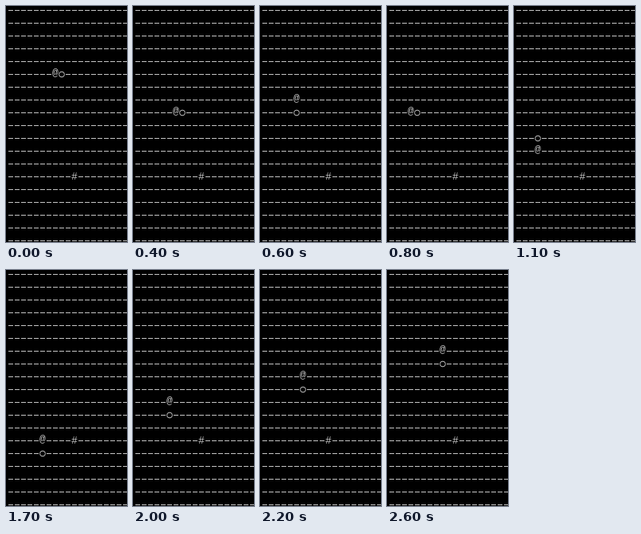
These frames come from a looping animation (152 by 295 pixels, 2700 ms). An HTML page with a canvas:

```html
<!DOCTYPE html>
<html lang="en">
<head>
<meta charset="utf-8">
<title>Snake</title>
<style>
  html, body { margin: 0; width: 100%; height: 100%; overflow: hidden; background: #000; }
  canvas { display: block; }
</style>
</head>
<body>
<canvas id="stage" width="152" height="295"></canvas>
<script>
const ctx = document.getElementById('stage').getContext('2d');
const COLS = 19, ROWS = 19, TICK = 100, STEPS = 27;
const INK = '#c4c4c4';
const FOOD = [10, 13];
const MOVES = { L: [-1, 0], R: [1, 0], U: [0, -1], D: [0, 1] };

// Cells visited by the head, beginning with the first tail cell.
const path = [[8, 5]];
for (const move of 'LDDDLLULDLDDDRDDDRUUUUURUURRU') {
  const [col, row] = path[path.length - 1];
  const [dx, dy] = MOVES[move];
  path.push([col + dx, row + dy]);
}

const centre = ([col, row]) => [6 + 8 * col, 5 + 16 * row];

function clearCell(cell) {
  const [x, y] = centre(cell);
  ctx.fillStyle = '#000';
  ctx.fillRect(x - 4, y - 7, 8, 14);
  ctx.fillStyle = INK;
}

function drawGlyph(char, cell, baseline) {
  clearCell(cell);
  const [x, y] = centre(cell);
  ctx.fillText(char, x, y + baseline);
}

function drawTail(cell) {
  clearCell(cell);
  const [x, y] = centre(cell);
  ctx.beginPath();
  ctx.arc(x, y + 0.5, 3.4, 0, Math.PI * 2);
  ctx.stroke();
}

function draw() {
  const step = Math.floor(performance.now() / TICK) % STEPS;
  // The snake takes a double move on two of the ticks.
  const head = step + 1 + (step >= 7) + (step >= 21);

  ctx.fillStyle = '#000';
  ctx.fillRect(0, 0, 152, 295);
  ctx.fillStyle = ctx.strokeStyle = INK;
  ctx.lineWidth = 1;
  ctx.font = '13px "Liberation Mono", monospace';
  ctx.textAlign = 'center';

  for (let row = 0; row < ROWS; row++) {
    for (let col = 0; col < COLS; col++) {
      ctx.fillRect(3 + 8 * col, 5 + 16 * row, 6, 1);
    }
  }
  drawGlyph('#', FOOD, 4);
  drawTail(path[head - 1]);
  drawGlyph('@', path[head], 2);
  requestAnimationFrame(draw);
}
draw();
</script>
</body>
</html>
```
